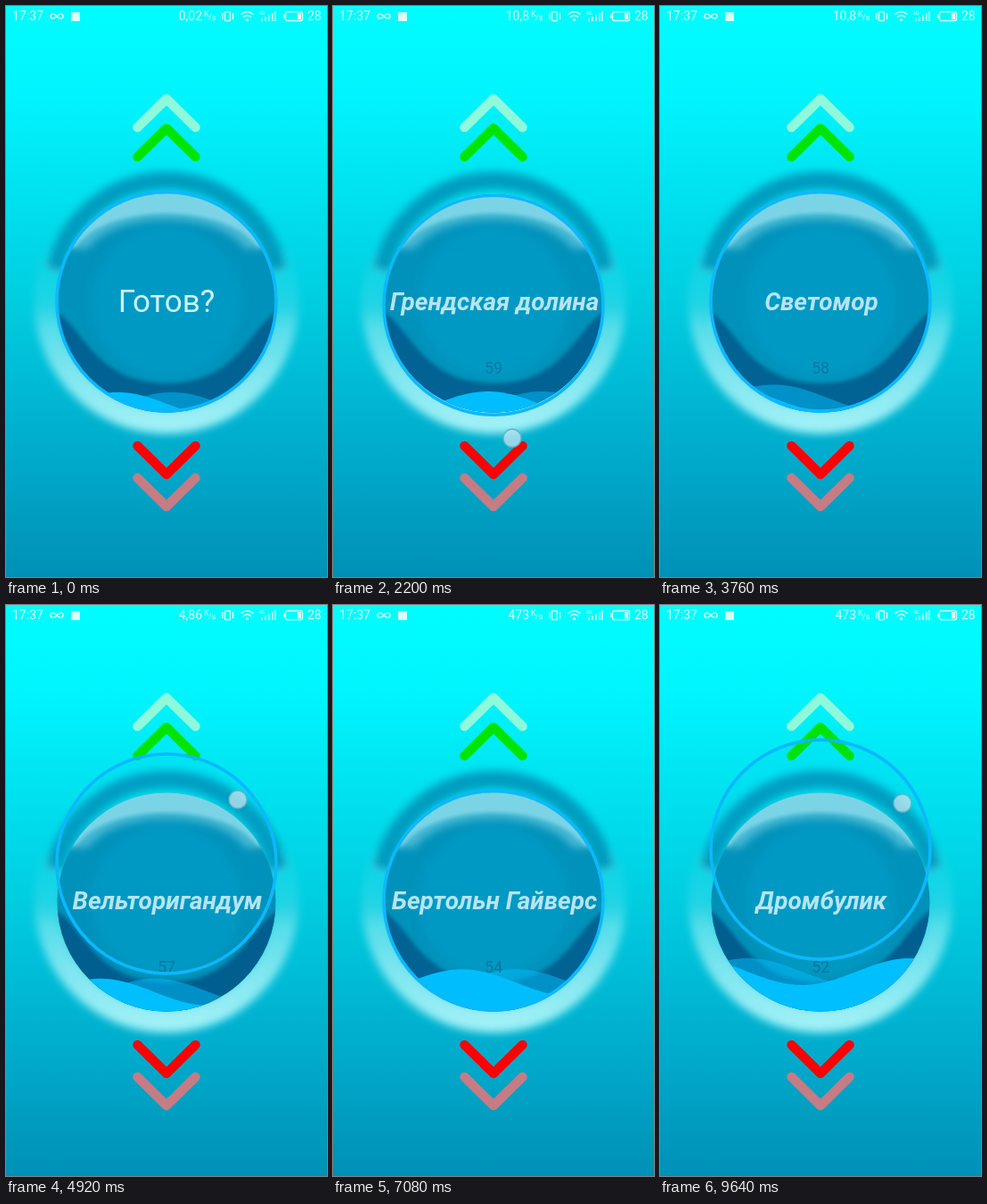
These frames come from a looping animation (360 px wide and 640 px high, 9680 ms). An HTML page:

```html
<!DOCTYPE html>
<html lang="ru">
<head>
<meta charset="utf-8">
<title>Готов?</title>
<style>
  html, body { margin: 0; width: 100%; height: 100%; overflow: hidden; background: #00cfe2; }
  svg { display: block; width: 100vw; height: 100vh; font-family: Roboto, sans-serif; }
  .word { font: italic 700 28px Roboto, sans-serif; fill: #bfe9f2; text-anchor: middle; }
  .ready { font: 400 35px Roboto, sans-serif; fill: #d9f6fa; }
  .arrow { fill: none; stroke-width: 10.5; stroke-linecap: round; stroke-linejoin: round; }
  .status { fill: #fff; font-size: 14px; opacity: .85; }
  .line { fill: none; stroke: #fff; stroke-width: 1.4; }
</style>
</head>
<body>
<svg viewBox="0 0 360 640">
  <defs>
    <linearGradient id="sky" x2="0" y2="1">
      <stop offset="0" stop-color="#00fdff"/>
      <stop offset=".16" stop-color="#00f4fd"/>
      <stop offset=".5" stop-color="#00cfe2"/>
      <stop offset=".8" stop-color="#00a9ca"/>
      <stop offset="1" stop-color="#0090b7"/>
    </linearGradient>
    <linearGradient id="glow" gradientUnits="userSpaceOnUse" x1="0" y1="270" x2="0" y2="470">
      <stop offset="0" stop-color="#a8f4f8" stop-opacity="0"/>
      <stop offset=".33" stop-color="#a8f4f8" stop-opacity=".2"/>
      <stop offset=".45" stop-color="#a8f4f8" stop-opacity=".5"/>
      <stop offset=".7" stop-color="#a8f4f8" stop-opacity=".75"/>
      <stop offset="1" stop-color="#a8f4f8" stop-opacity=".95"/>
    </linearGradient>
    <filter id="soft" filterUnits="userSpaceOnUse" x="0" y="150" width="360" height="360">
      <feGaussianBlur stdDeviation="5"/>
    </filter>
    <filter id="edge" filterUnits="userSpaceOnUse" x="0" y="150" width="360" height="360">
      <feGaussianBlur stdDeviation="2"/>
    </filter>
    <clipPath id="disc"><circle cx="180" cy="333" r="122.500"/></clipPath>
  </defs>

  <rect width="360" height="640" fill="url(#sky)"/>

  <g class="status">
    <text x="7" y="16">17:37</text>
    <path class="line" d="M57 11.500C54 8 50 8 50 11.500S54 15 57 11.500S64 8 64 11.500S60 15 57 11.500"/>
    <rect x="73" y="7" width="10" height="10"/>
    <text id="speed" x="220" y="16" text-anchor="end"></text>
    <text x="222" y="12" font-size="9">K</text>
    <text x="227" y="16" font-size="9">/s</text>
    <rect class="line" x="245.500" y="6.500" width="6" height="10" rx="1"/>
    <path class="line" d="M243 8v7M254.500 8v7"/>
    <path class="line" d="M263.500 9.500Q270.500 3.500 277.500 9.500M266 12.500Q270.500 8.500 275 12.500"/>
    <circle cx="270.500" cy="15.500" r="1.600"/>
    <text x="284" y="10" font-size="5">4G</text>
    <path class="line" d="M287 17v-3M291 17v-5M295 17v-7M299 17v-9M302 17v-11"/>
    <rect class="line" x="313.500" y="6.500" width="19" height="10" rx="2"/>
    <path d="M311 9.500h2v4h-2zM327 8h4v7h-4z"/>
    <text x="338" y="16">28</text>
  </g>

  <g class="arrow">
    <path stroke="#8ffadb" d="M147.500 136l32.500-32 32.500 32"/>
    <path stroke="#00e400" d="M147.500 169l32.500-32 32.500 32"/>
    <path stroke="#fe0000" d="M147.500 493l32.500 32 32.500-32"/>
    <path stroke="#c67c84" d="M147.500 529l32.500 32 32.500-32"/>
  </g>

  <g fill="none" filter="url(#soft)">
    <circle cx="180" cy="331" r="134" stroke="url(#glow)" stroke-width="29"/>
    <path stroke="#0093ba" stroke-opacity=".88" stroke-width="20" d="M55 296A128 128 0 0 1 305 296"/>
  </g>

  <g clip-path="url(#disc)">
    <rect x="50" y="200" width="260" height="260" fill="#0090b8"/>
    <circle cx="180" cy="331" r="85" fill="#0098c1" filter="url(#soft)"/>
    <path fill="#005f8f" filter="url(#edge)"
      d="M50 340C85 352 95 423 180 423S275 352 310 340V470H50Z"/>
    <path fill="#a5eaf3" fill-opacity=".45" filter="url(#soft)"
      d="M60 272V200H300V272H268C238 229 122 229 92 272Z"/>
    <path fill="#a9ecf4" fill-opacity=".6" filter="url(#edge)"
      d="M60 270V200H300V270H282C246 220 114 220 78 270Z"/>
    <path id="back" fill="#00bfff" fill-opacity=".5"/>
    <path id="front" fill="#00bfff"/>
  </g>

  <text id="count" x="180" y="412" font-size="18" text-anchor="middle" fill="#00648f" fill-opacity=".65"></text>
  <text id="word" class="word"></text>
  <circle id="ring" cx="180" r="123" fill="#00a0d8" fill-opacity=".06" stroke="#0cb8fc" stroke-width="3.600"/>
  <circle id="touch" r="10" fill="#c4e6ef" fill-opacity=".75" stroke="#5fb4cc" stroke-width="1.400"/>
</svg>

<script>
const LOOP = 9680, STEP = 40, START = 950;
const CX = 180, CY = 331, WAVE = 244, AMP = 15;
const el = Object.fromEntries(
  ['speed', 'back', 'front', 'count', 'word', 'ring', 'touch']
    .map(id => [id, document.getElementById(id)]));

const words = ['Готов?', 'Грендская долина', 'Светомор', 'Вельторигандум',
  'Бертольн Гайверс', 'Вендик\nБурлевский', 'Дромбулик'];

// Each swipe ends by showing the next word.
const swipes = [
  { from: 550, to: START, x: 262, y: 290, dy: -85 },
  { from: 2140, to: 2580, x: 201, y: 480, dy: 85 },
  { from: 3860, to: 4260, x: 205, y: 450, dy: 80 },
  { from: 4720, to: 5120, x: 260, y: 259, dy: -82 },
  { from: 7240, to: 7640, x: 204, y: 460, dy: 80 },
  { from: 8520, to: 8920, x: 204, y: 460, dy: 80 },
  { from: 9420, to: 9820, x: 272, y: 279, dy: -99 }
];
const speeds = [[0, '0,02'], [960, '10,8'], [3960, '4,86'], [6960, '473']];

const smooth = p => p * p * (3 - 2 * p);

function wavePath(crest, level) {
  let d = 'M56 460';
  for (let x = 56; x <= 304; x += 4) {
    const y = level - AMP * Math.cos(2 * Math.PI * (x - crest) / WAVE);
    d += `L${x} ${y.toFixed(2)}`;
  }
  return d + 'L304 460Z';
}

function setText(node, text) {
  if (node.textContent !== text) node.textContent = text;
}

let shown = -1;
function showWord(i) {
  if (i === shown) return;
  shown = i;
  const lines = words[i].split('\n');
  el.word.setAttribute('class', i ? 'word' : 'word ready');
  el.word.replaceChildren(...lines.map((line, n) => {
    const span = document.createElementNS('http://www.w3.org/2000/svg', 'tspan');
    span.setAttribute('x', i ? CX + 1 : CX);
    span.setAttribute('y', lines.length > 1 ? 326 + 30 * n : i ? 341 : 343);
    span.textContent = line;
    return span;
  }));
}

function drawSwipe(t) {
  let shift = 0, finger = null;
  for (const s of swipes) {
    if (t >= s.from && t < s.to) {
      shift = s.dy * smooth((t - s.from) / (s.to - s.from));
      finger = s;
    } else if (t >= s.to && t < s.to + 200) {
      shift = s.dy * (1 - (t - s.to) / 200) ** 2;
    }
  }
  el.ring.setAttribute('cy', CY + shift);
  el.touch.style.display = finger ? '' : 'none';
  if (finger) {
    el.touch.setAttribute('cx', finger.x);
    el.touch.setAttribute('cy', finger.y + shift);
  }
}

function draw(t) {
  const crest = 125 + WAVE * t / 1000;
  const level = Math.min(448, 447 - 4.85 * (t - 2200) / 1000);
  el.front.setAttribute('d', wavePath(crest, level));
  el.back.setAttribute('d', wavePath(crest + WAVE / 4, level));
  setText(el.speed, speeds.filter(s => t >= s[0]).pop()[1]);
  setText(el.count, t < START ? '' : String(60 - Math.floor((t - START) / 1000)));
  showWord(swipes.filter(s => t >= s.to).length);
  drawSwipe(t);
}

const begin = performance.now();
function tick() {
  const t = Math.max(0, performance.now() - begin) % LOOP;
  draw(Math.floor(t / STEP) * STEP);
  requestAnimationFrame(tick);
}
tick();
</script>
</body>
</html>
```
